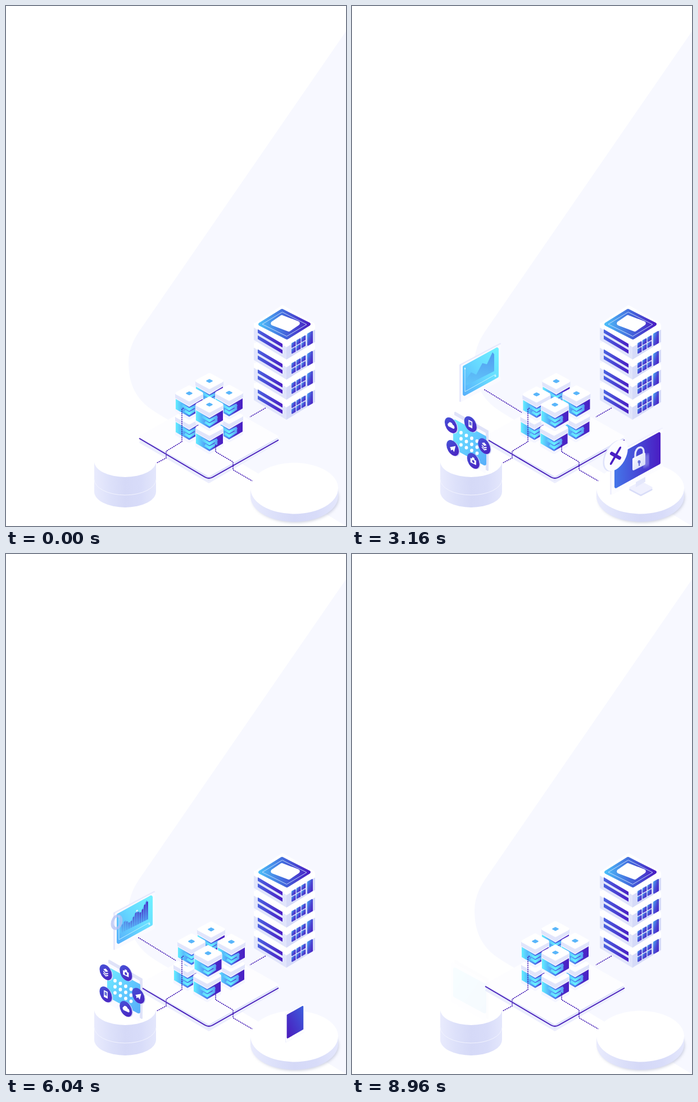
These frames come from a looping animation (605 by 925 pixels, 9000 ms). An HTML page:

```html
<!DOCTYPE html>
<html lang="en">
<head>
<meta charset="utf-8">
<title>Isometric cloud devices</title>
<style>
html, body { margin: 0; width: 100%; height: 100%; overflow: hidden; background: #fff; }
svg { display: block; width: 605px; height: 925px; }
</style>
</head>
<body>
<svg id="stage" viewBox="0 0 605 925" fill="none"></svg>
<script>
const svg = document.getElementById('stage');
const LOOP = 9000, PURPLE = '#4a1fc4', LILAC = '#e1e5fb', SHADE = '#d6dbf8', SLOPE = .57;

// Drawing helpers; a radius r keeps the outline and rounds its corners
const path = (d, fill, extra = '') => `<path d="${d}" fill="${fill}" ${extra}/>`;
const line = (d, color, width, extra = '') => `<path d="${d}" stroke="${color}" stroke-width="${width}" ${extra}/>`;
const oval = (x, y, rx, ry, fill, extra = '') => `<ellipse cx="${x}" cy="${y}" rx="${rx}" ry="${ry}" fill="${fill}" ${extra}/>`;
const group = (id, body, move = '') => `<g ${id && `id="${id}"`} ${move && `transform="${move}"`}>${body}</g>`;
const times = (n, fn) => Array.from({ length: n }, (_, i) => fn(i)).join('');
const dots = d => line(d, '#3f16b4', 1.5, 'stroke-dasharray="2.4 1.1"');
const rounded = (d, fill, r) => path(d, fill, r ? `stroke="${fill}" stroke-width="${2 * r}" stroke-linejoin="round"` : '');

// Upright face from its left top corner; k > 0 falls to the right
const wall = (x, y, w, h, k, fill, r = 0) => {
  const run = w - 2 * r;
  return rounded(`M${x + r} ${y + r * (1 + k)}l${run} ${run * k}v${h - 2 * r}l${-run} ${-run * k}Z`, fill, r);
};
// Flat face around its centre; lean shifts the top corner left and the bottom corner right
const tile = (x, y, w, h, fill, r = 0, lean = 0) => {
  const a = w - r * 1.2, b = h - r * 1.1;
  return rounded(`M${x - a} ${y}L${x - lean} ${y - b}L${x + a} ${y}L${x + lean} ${y + b}Z`, fill, r);
};
const block = (x, y, w, h, depth, top, left, right) =>
  wall(x - w, y, w, depth, h / w, left) + wall(x, y + h, w, depth, -h / w, right) + tile(x, y, w, h, top);

const gradient = (id, [x1, y1, x2, y2], ...colors) =>
  `<linearGradient id="${id}" x1="${x1}" y1="${y1}" x2="${x2}" y2="${y2}">` +
  colors.map((c, i) => `<stop offset="${i / (colors.length - 1)}" stop-color="${c}"/>`).join('') + '</linearGradient>';
const ACROSS = [0, 0, 1, 0], DOWN = [0, 0, 0, 1], FALL = [0, 0, 1, 1], RISE = [1, 0, 0, 1];

const defs = `<defs>
${gradient('roof', ACROSS, '#4cbcf8', '#4468dc', PURPLE)}
${gradient('slot', ACROSS, '#4a62e0', PURPLE)}
${gradient('pane', FALL, '#4aa5f2', '#4a4cd4', PURPLE)}
${gradient('cubeL', ACROSS, '#63eeff', '#55b4fa', '#4d78ee')}
${gradient('cubeR', ACROSS, '#4a7cf0', '#4a2cc8', PURPLE)}
${gradient('band', ACROSS, '#5cc4fb', '#68f2ff', '#5a9cf4')}
${gradient('side', ACROSS, '#e9ebfd', '#dde1fa', '#d5d9f7', '#d8dcf9', '#e4e7fc')}
${gradient('screenL', RISE, '#70f0ff', '#66d8ff', '#58b2fb')}
${gradient('screenT', FALL, '#70eaff', '#62cbff', '#59b0fa')}
${gradient('screenR', ACROSS, '#4474e8', '#4649d6', PURPLE)}
${gradient('screenP', RISE, '#3d5ddc', '#443bcc', '#4a1cbc')}
${gradient('badge', FALL, '#4658da', '#4a1cbe')}
${gradient('lockG', FALL, '#ffffff', '#cfd5f6')}
${gradient('area', RISE, '#4b8cec', '#62c8fa')}
${gradient('barG', DOWN, '#4a24c2', '#4c8cee')}
<filter id="soft"><feGaussianBlur stdDeviation="2.5"/></filter>
</defs>`;

const floor = times(4, i => group('',
  block(495.5, 565.5, 54, 33.5, 30, '#fff', LILAC, SHADE) , '')).slice(0, 0);

const towerUnit = i => group('',
  wall(441, 564, 58, 30, .6, LILAC) + wall(499, 599, 51, 30, -.62, SHADE) +
  wall(441, 563, 58, 9, .6, '#fff') + wall(499, 598, 51, 9, -.62, '#fff') +
  tile(495.5, 566, 54, 34, '#fff', 2, 3.5) +
  times(2, k => wall(448, 575 + k * 11, 44, 6.5, .59, 'url(#slot)')) +
  times(6, k => wall(508 + k % 3 * 8.8, 600 - k % 3 * 5.2 + (k > 2) * 10.5, 7.5, 8.5, -SLOPE, 'url(#pane)', 1)) +
  wall(536, 583, 10, 22, -SLOPE, 'url(#pane)', 1.2), `translate(0 ${i * 35.7})`);

const tower = times(4, i => towerUnit(3 - i)) +
  tile(495.5, 566, 47, 27.5, 'url(#roof)', 3, 4.5) +
  line('M456 566L491.500 544.500 535 566.500 499.500 587.500Z', '#cfe4ff', .9) +
  tile(497, 564.5, 26.5, 15, '#fff', 4, 6);

const cube = id => group(id,
  wall(-25, 0, 25, 33, .58, '#f4f5ff', 1) + wall(0, 14.5, 25, 33, -.58, '#f4f5ff', 1) +
  wall(-24, 10, 24, 18, .58, 'url(#cubeL)') + wall(0, 24, 24, 18, -.58, 'url(#cubeR)') +
  line('M-13 21L0 29 14 21M-8 31L0 36 12 29V21', 'url(#band)', 4.5) +
  block(0, 1, 25, 14.5, 7, LILAC, LILAC, LILAC) + tile(0, 0, 25, 14.5, '#fff', 2.5) +
  tile(0, 0, 6, 3.6, '#5ab6fa', 1.2));

const lock = (id, x, y) => group(id,
  wall(6, -8, 13, 22, -.5, '#b9c2fa', 2).replace('/>', ' opacity=".45" filter="url(#soft)"/>') +
  line('M-7 -3V-11C-7 -25 8 -29 8 -16V-10', LILAC, 3.4) +
  wall(-12, -4, 23, 22, -.5, 'url(#lockG)', 2) +
  oval(0, 2, 2.6, 3, '#6a73d8') + line('M0 3V9', '#6a73d8', 2), `translate(${x} ${y})`);

const monitor = group('monitor',
  tile(514, 860, 21, 12, '#d9ddf8', 2) + tile(514, 857, 21, 12, '#eff0fe', 2) +
  wall(505, 838, 17, 18, -SLOPE, '#e4e7fb') +
  wall(459, 800, 94, 70, -.54, '#f0f1fe', 1.5) + wall(462, 801, 91, 69, -.54, '#fcfcff', 1) +
  wall(467, 802, 82, 57, -.55, 'url(#screenR)', 2.4) +
  lock('lockA', 511, 809) +
  group('cross', group('',
    oval(-2, -1, 24, 25, '#dfe3fb') + oval(1, 0, 24, 25, '#fcfcff') +
    line('M-9 -9L9 9M9 -9L-9 9', PURPLE, 5, 'stroke-linecap="round"'), 'matrix(.87 -.5 0 1 0 0)')));

const phone = group('phone',
  wall(486, 793, 52, 80, -SLOPE, '#eff0fe', 1.5) + wall(488, 793, 50, 78, -SLOPE, '#fff', 1) +
  wall(490, 796, 46, 66, -SLOPE, 'url(#screenP)', 2) +
  lock('lockB', 515, 819));

// Area chart: a few heights along a baseline that rises with the screen
const curve = [[0, 11], [9, 19], [18, 10], [29, 25], [37, 19], [47, 35], [50, 30]];
const height = x => {
  const i = curve.findIndex(p => p[0] >= x);
  const [[x0, h0], [x1, h1]] = [curve[i - 1], curve[i]];
  return h0 + (h1 - h0) * (x - x0) / (x1 - x0);
};
const chart = group('area-chart', path('M0 0L' + curve.map(([x, h]) => `${x} ${-h}`).join('L') + 'V0Z', 'url(#area)', 'opacity=".85"')) +
  group('bars', times(12, i => {
    const x = 4 + i * 4, h = height(x) * .95;
    return `<rect x="${x - 1.4}" y="${-h}" width="2.9" height="${h}" fill="url(#barG)" opacity="${.25 + i * .065}"/>`;
  }) + oval(30, -25, 1.6, 1.6, '#e7f5ff'));

const display = group('display',
  dots('M235 682L302 723') +
  wall(191, 638, 74, 67, -.53, '#e7e9fc', 1.5) + wall(194, 639, 71, 65, -.53, '#fafaff', 1) +
  wall(197, 641, 64, 54, -.55, 'url(#screenL)', 3) +
  line('M201 643V686L256 655', '#d9f8ff', .8) + oval(201, 645, 1.3, 1.5, '#d9f8ff') + oval(255, 658, 1.5, 1.5, '#d9f8ff') +
  group('', chart, 'matrix(1 -.51 0 1 203 675)') +
  group('ring',
    oval(0, 0, 8, 11, 'none', 'stroke="#b4c0f2" stroke-width="5" opacity=".8"') +
    group('ringFill', line('M1 -11A8 11 0 1 0 8 0', '#4a2cc4', 5) + line('M3 -10A8 11 0 0 1 8 0', '#e6eafe', 5)),
    'translate(197 655) skewY(-16)') +
  group('columns',
    block(254, 663, 7, 4, 35, '#4a2cc4', '#f7f8ff', LILAC) +
    block(245, 677, 7, 4, 25, '#79eeff', '#68e2ff', '#5ab4fa') +
    block(235, 694, 7, 4, 14, '#4a2cc4', '#fbfbff', LILAC)));

const glyphs = {
  rocket: path('M-6 1L6 -6 3 6 0 3 -4 6V3Z', '#fff'),
  cloud: path('M-5 4A3 3 0 0 1 -5 -1.500A5 5 0 0 1 4 -2.500A3.300 3.300 0 0 1 5 4Z', '#fff'),
  card: path('M-4 -6H4V6H-4Z', '#fff') + path('M-2.500 -4H2.500V2H-2.500Z', '#6a73d8'),
  stack: tile(0, -3.5, 5, 3, '#fff') + line('M-5 0L0 3 5 0M-5 3.500L0 6.500 5 3.500', '#fff', 1.8),
  camera: path('M-6 -3H-3L-2 -6H2L3 -3H6V5H-6Z', '#fff') + oval(0, 1, 2.5, 2.5, '#4a3cca')
};
const icons = Object.keys(glyphs);
const popOrder = ['stack', 'camera', 'cloud', 'card', 'rocket'];

const tablet = group('tablet',
  wall(182, 721, 61, 72, SLOPE, '#dfe2f8', 1.5) + wall(177, 725, 61, 72, SLOPE, '#fbfbff', 1.5) +
  wall(180, 734, 59, 53, .54, 'url(#screenT)', 3) +
  group('grid', times(12, i => oval(194 + i % 4 * 9.5, 759 + i % 4 * 5 + (i >> 2) * 10.8, 2.9, 3.2, '#fff'))) +
  icons.map(n => group(n, oval(2, 0, 13, 13, '#cfd5f6') + oval(0, 0, 13, 13, 'url(#badge)') + glyphs[n])).join(''));

const platform =
  tile(361, 776, 124, 73, '#eceefd', 2) + tile(361, 771, 124, 73, '#dfe3fb', 2) +
  tile(361, 766, 124, 71, '#fdfdff', 2) +
  line('M237 769L354 838Q361 842 368 838L485 772', '#4519b8', 1.8);

const cylinder = (x, y, rx, ry, depth) =>
  path(`M${x - rx} ${y}v${depth}a${rx} ${ry} 0 0 0 ${2 * rx} 0v${-depth}Z`, 'url(#side)') +
  oval(x, y, rx, ry, '#fff');
const drum = cylinder(212, 810, 55, 28, 54) + line('M157 842a55 28 0 0 0 110 0', '#f3f4ff', 1);
const disc = oval(515, 875, 77, 44, '#aeb4cf', 'filter="url(#soft)" opacity=".6"') + cylinder(513, 858, 78, 45.5, 14);

// Cubes from back to front: place of the upper one, sideways drift of the lower and the upper one
const stacks = [[362, 667, 0, 2], [326, 689, -2, 3], [397, 688, 2, 3], [362, 709, -3, -1.5]];
const cubes = stacks.flatMap(([x, y, low, high], i) => [
  { id: `low${i}`, x, y: y + 41, drift: low, lift: 0 },
  { id: `high${i}`, x, y, drift: high, lift: 1 }
]);

svg.innerHTML = defs +
  path('M605 45L598 55 236 580Q218 607 218 634C218 681 238 706 270 725L605 925Z', '#f7f8ff') +
  platform + tower + dots('M462 715L434 731') + cubes.map(c => cube(c.id)).join('') +
  dots('M316 715L313 717V775L285 792V804L268 813') + dots('M373 780V793L404 811V825L440 846') +
  display + drum + tablet + disc + monitor + phone;

const el = id => document.getElementById(id);
const move = (id, value) => el(id).setAttribute('transform', value);
const fade = (id, value) => el(id).setAttribute('opacity', value);
const ramp = (t, a, b) => {
  const p = Math.min(1, Math.max(0, (t - a) / (b - a)));
  return p * p * (3 - 2 * p);
};
const during = (t, a, b, c, d) => ramp(t, a, b) * (1 - ramp(t, c, d));
const growAt = (id, x, y, s) => move(id, `translate(${x} ${y}) scale(${s}) translate(${-x} ${-y})`);

function draw(t) {
  // The cubes drift apart and breathe together
  const apart = during(t, 0, 1500, 7300, 8900), breath = Math.cos((t - 1600) / 4500 * 2 * Math.PI);
  cubes.forEach(({ id, x, y, drift, lift }, i) => {
    const dx = apart * (drift + Math.sign(drift) * breath);
    const dy = apart * lift * (1 + Math.sin(t / 700 + i));
    move(id, `translate(${x + dx} ${y + dy})`);
  });

  fade('display', during(t, 300, 900, 8350, 8850));
  move('area-chart', `scale(1 ${during(t, 1750, 3100, 7700, 8250)})`);
  move('bars', `scale(1 ${during(t, 3700, 4700, 7500, 8100)})`);
  fade('ring', during(t, 5700, 6100, 7600, 8000));
  fade('ringFill', ramp(t, 6300, 6900));
  const rise = during(t, 6500, 7050, 7450, 7900);
  move('columns', `translate(0 ${708 * (1 - rise)}) scale(1 ${rise})`);

  fade('tablet', during(t, 150, 750, 8400, 9050));
  fade('grid', during(t, 750, 1100, 7900, 8300));
  const turn = 144 * ramp(t, 1840, 3323) + 216 * ramp(t, 4600, 6000);
  icons.forEach((id, i) => {
    const a = (i * 72 + turn) * Math.PI / 180, pop = 980 + popOrder.indexOf(id) * 110;
    const s = during(t, pop, pop + 540, 7500, 8100);
    const x = 203.4 + 32 * Math.cos(a) * s, y = 773.6 + (12.2 * Math.cos(a) + 33.5 * Math.sin(a)) * s;
    move(id, `translate(${x} ${y}) scale(${s}) matrix(.85 .42 0 1 0 0)`);
  });

  growAt('monitor', 514, 860, during(t, 150, 700, 3350, 3600) + during(t, 3800, 4200, 5600, 5850));
  fade('lockA', during(t, 1100, 1500, 3350, 3600) + ramp(t, 4400, 4800));
  move('cross', `translate(469 800) scale(${during(t, 2850, 3080, 3350, 3600)})`);
  growAt('phone', 517, 863, during(t, 5850, 6170, 7900, 8450));
  fade('lockB', during(t, 6550, 7000, 7600, 7850));
}

const start = performance.now();
function tick() {
  draw((performance.now() - start) % LOOP);
  requestAnimationFrame(tick);
}
tick();
</script>
</body>
</html>
```
